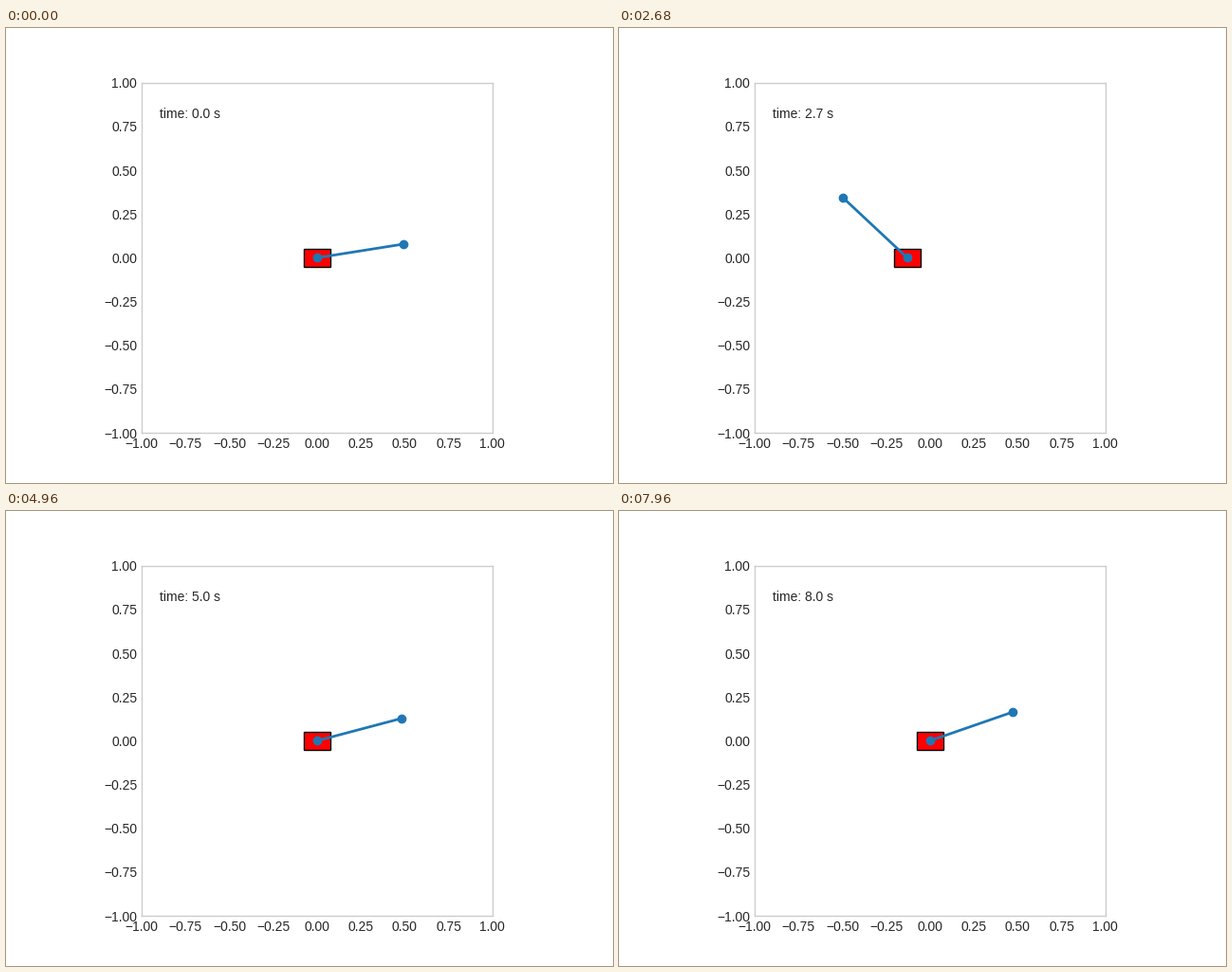
Animation, 640 px wide and 480 px high, one loop 8 s. Source, as a matplotlib script:

```python
import math

import matplotlib.pyplot as plt
from matplotlib.animation import FuncAnimation
from matplotlib.patches import Rectangle

FRAMES, INTERVAL = 200, 40
G, LENGTH = 9.81, 0.5
CART_MASS, BOB_MASS = 0.5, 0.2
START_ANGLE = math.radians(81)
CART_W, CART_H = 0.15, 0.1
INK = "0.15"

plt.rcParams.update({
    "font.family": "Liberation Sans",
    "font.size": 10,
    "text.color": INK,
    "axes.edgecolor": "0.8",
    "axes.linewidth": 1,
    "lines.solid_capstyle": "round",
})


def simulate(substeps=40):
    """Return (cart position, pendulum angle) for every frame."""
    dt = INTERVAL / 1000 / substeps
    pull = BOB_MASS * LENGTH / (CART_MASS + BOB_MASS)
    x, v, angle, spin = 0.0, 0.0, START_ANGLE, 0.0
    states = []
    for _ in range(FRAMES):
        states.append((x, angle))
        for _ in range(substeps):
            spin -= G / LENGTH * math.sin(angle) * dt / 2
            angle += spin * dt / 2
            v -= pull * spin ** 2 * math.sin(angle) * dt
            x += v * dt
            angle += spin * dt / 2
            spin -= G / LENGTH * math.sin(angle) * dt / 2
    return states


states = simulate()

fig, ax = plt.subplots(figsize=(6.4, 4.8), dpi=100, facecolor="white")
ax.set(xlim=(-1, 1), ylim=(-1, 1))
ax.set_aspect("equal")
ax.tick_params(length=0, pad=3.5, labelcolor=INK)

cart = ax.add_patch(Rectangle((0, -CART_H / 2), CART_W, CART_H,
                              facecolor="red", edgecolor="black", linewidth=1))
rod, = ax.plot([], [], "o-", color="#1f77b4", lw=2, markersize=6)
clock = ax.text(0.05, 0.9, "", transform=ax.transAxes)


def draw(i):
    x, angle = states[i]
    cart.set_x(x - CART_W / 2)
    rod.set_data([x, x + LENGTH * math.sin(angle)],
                 [0, LENGTH * math.cos(angle)])
    clock.set_text(f"time: {i * INTERVAL / 1000:.1f} s")
    return cart, rod, clock


anim = FuncAnimation(fig, draw, frames=FRAMES, interval=INTERVAL,
                     repeat=True, repeat_delay=0)
plt.show()
```
